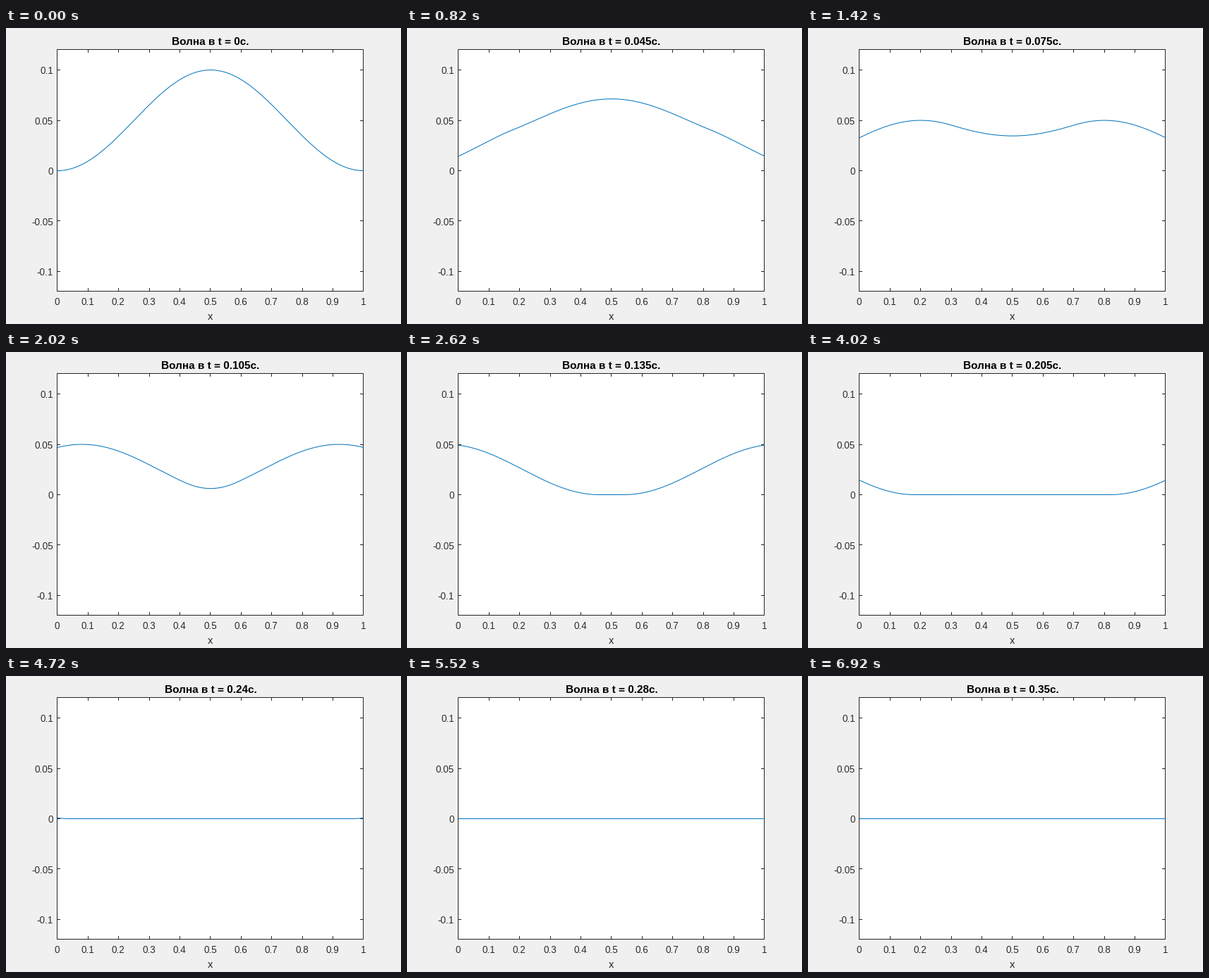
Write a matplotlib script that moves like this. It is 560 by 420 pixels and loops after 7020 ms.

```python
import matplotlib.pyplot as plt
import numpy as np
from matplotlib.animation import FuncAnimation

plt.rcParams["font.family"] = "Liberation Sans"
plt.rcParams["text.hinting"] = "native"

W, H = 560, 420
LEFT, RIGHT, TOP, BOTTOM = 73, 507, 31, 374
Y_LIMIT = 0.12
TICK = 4.5
SPEED = 4
TIME_STEP = 0.005
INTERVAL = 20
HOLD = 5  # animation frames per time step
STEPS = 70
INK = "#262626"

# At 72 dpi one point is one pixel.
fig = plt.figure(figsize=(W / 72, H / 72), dpi=72, facecolor="#f0f0f0")
ax = fig.add_axes([0, 0, 1, 1])
ax.set(xlim=(0, W), ylim=(H, 0))
ax.axis("off")


def px(x):
    return LEFT + x * (RIGHT - LEFT)


def py(u):
    return (TOP + BOTTOM) / 2 - u / Y_LIMIT * (BOTTOM - TOP) / 2


def center(v):
    """Middle of the pixel that holds v; whole numbers go to the one before."""
    return np.ceil(round(v, 6)) - 0.5


def rule(x, y):
    ax.plot(x, y, color=INK, lw=1, snap=False, solid_capstyle="butt")


def label(x, y, text, size=13.4, **style):
    style = {"color": INK, "ha": "center", "va": "baseline", **style}
    return ax.text(x, y, text, fontsize=size, **style)


def pulse(x):
    return np.where((x >= 0) & (x <= 1), 0.1 * np.sin(np.pi * x) ** 2, 0)


def wave(x, t):
    shift = SPEED * t
    return (pulse(x - shift) + pulse(x + shift)) / 2


left, right, top, bottom = map(center, (LEFT, RIGHT, TOP, BOTTOM))
ax.add_patch(plt.Rectangle((left, top), right - left, bottom - top,
                           fc="white", ec=INK, lw=1, snap=False))

for i in range(11):
    x = center(px(i / 10))
    rule([x, x], [bottom, bottom - TICK])
    rule([x, x], [top, top + TICK])
    label(px(i / 10) - 0.5, 393, f"{i / 10:g}")

for i in range(-2, 3):
    y = center(py(i / 20))
    rule([left, left + TICK], [y, y])
    rule([right, right - TICK], [y, y])
    label(67, py(i / 20) + 5.6, f"{i / 20:g}", ha="right")

label(289.5, 414, "x", 15)
title = label(290, 24, "", 15.4, color="black", weight="bold")

xs = np.linspace(0, 1, 201)
curve, = ax.plot([], [], color="#0072bd", lw=1, snap=False,
                 solid_capstyle="butt", zorder=3)


def update(frame):
    # The opening step lasts a single frame.
    t = TIME_STEP * ((frame + HOLD - 1) // HOLD)
    curve.set_data(px(xs), py(wave(xs, t)))
    title.set_text(f"Волна в t = {t:g}с.")
    return curve, title


anim = FuncAnimation(fig, update, frames=1 + HOLD * STEPS, interval=INTERVAL,
                     repeat=True, repeat_delay=0)
plt.show()
```
